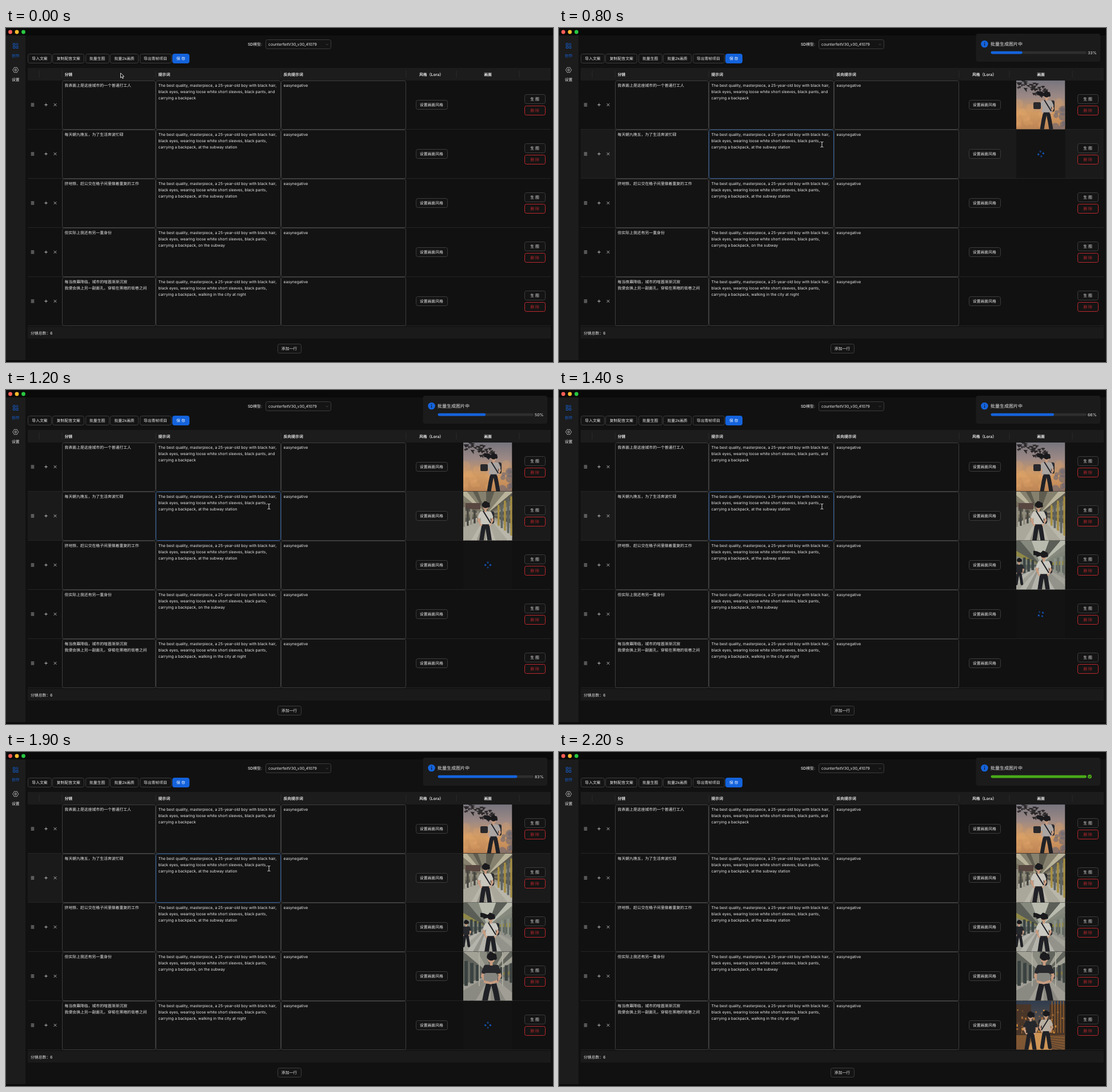
An HTML page with a canvas that plays this animation: 957x585 px, repeating every 2.3 s.

```html
<!DOCTYPE html>
<html lang="zh-CN">
<head>
<meta charset="utf-8">
<style>
html, body { margin: 0; width: 100%; height: 100%; overflow: hidden; background: #0b0b0b; }
canvas { display: block; width: 957px; height: 585px; }
</style>
</head>
<body>
<canvas id="stage"></canvas>
<script>
const W = 957, H = 585, LOOP = 2300, STEP = 100;
const START = 300, PER_ROW = 350, END = 2100;
const ROW_TOP = 92, ROW_H = 86, LINE = 11.4, PIC = 85.5, GAP = 2.5;
const COLS = [98, 262, 481, 700];
const BLUE = '#1463dc', RED = '#bd282e', GREEN = '#49aa19', TEXT = '#ebebeb', EDGE = '#3c3c3c';
const HAIR = '#1b1b1e', SKIN = '#c89c80';
const FAMILY = 'Inter, "Noto Sans CJK SC", "Noto Sans CJK", sans-serif';

const canvas = document.getElementById('stage');
const c = canvas.getContext('2d');
const dpr = window.devicePixelRatio || 1;
canvas.width = W * dpr;
canvas.height = H * dpr;

const PROMPT = 'The best quality, masterpiece, a 25-year-old boy with black hair,';
const WEAR = 'black eyes, wearing loose white short sleeves, black pants,';
const ROWS = [
  { story: ['我表面上是这座城市的一个普通打工人'], wear: WEAR + ' and', place: '', art: city },
  { story: ['每天朝九晚五，为了生活奔波忙碌'], place: ', at the subway station', art: station },
  { story: ['挤地铁、赶公交在格子间里做着重复的工作'], place: ', at the subway station', art: platform },
  { story: ['但实际上我还有另一重身份'], place: ', on the subway', art: train },
  { story: ['每当夜幕降临，城市的喧嚣渐渐沉寂', '我便会换上另一副面孔，穿梭在黑暗的街巷之间'],
    place: ', walking in the city at night', art: night }
];

// ---- drawing helpers
function rect(x, y, w, h, fill) {
  c.fillStyle = fill;
  c.fillRect(x, y, w, h);
}
function box(x, y, w, h, r, fill, edge) {
  c.beginPath();
  c.roundRect(x, y, w, h, r);
  if (fill) { c.fillStyle = fill; c.fill(); }
  if (edge) { c.strokeStyle = edge; c.lineWidth = 1; c.stroke(); }
}
function disc(x, y, r, fill) {
  c.fillStyle = fill;
  c.beginPath();
  c.arc(x, y, r, 0, Math.PI * 2);
  c.fill();
}
function ring(x, y, r, color) {
  c.strokeStyle = color;
  c.lineWidth = 0.8;
  c.beginPath();
  c.arc(x, y, r, 0, Math.PI * 2);
  c.stroke();
}
function trace(p) {
  c.beginPath();
  for (let i = 0; i < p.length; i += 2) c.lineTo(p[i], p[i + 1]);
}
function poly(fill, ...p) {
  trace(p);
  c.fillStyle = fill;
  c.fill();
}
function line(color, width, ...p) {
  trace(p);
  c.strokeStyle = color;
  c.lineWidth = width;
  c.stroke();
}
function setFont(size, weight) {
  c.font = `${weight} ${size}px ${FAMILY}`;
}
function text(s, x, y, { size = 6.85, color = TEXT, align = 'left', weight = 400 } = {}) {
  setFont(size, weight);
  c.textAlign = align;
  c.fillStyle = color;
  c.fillText(s, x, y + size * 0.37);
}
function button(s, x, y, { w, color = TEXT, edge = EDGE, fill = '#141414' } = {}) {
  setFont(6.85, 400);
  const width = w || c.measureText(s).width + 13.6;
  box(Math.floor(x) + 0.5, y, Math.round(width), 16, 3, fill, edge);
  text(s, x + width / 2, y + 8, { color, align: 'center' });
  return x + width + GAP;
}
function seeded(seed) {
  return () => (seed = (seed * 16807) % 2147483647) / 2147483647;
}
const pick = (list, rnd) => list[Math.floor(rnd() * list.length)];
const mix = (a, b, u) => a + (b - a) * Math.min(1, Math.max(0, u));

// ---- pictures
function sky(...stops) {
  const g = c.createLinearGradient(0, 0, 0, PIC);
  stops.forEach((s, i) => g.addColorStop(i / (stops.length - 1), s));
  rect(0, 0, PIC, PIC, g);
}
// wedges around a vanishing point: ceiling, walls and floor
function hall(vx, vy, seed, ceiling, wall, floor) {
  const rnd = seeded(seed), n = 36, turn = Math.PI * 2 / n;
  for (let i = 0; i < n; i++) {
    const a = i * turn, s = Math.sin(a + turn / 2);
    const tones = s < -0.45 ? ceiling : s > 0.4 ? floor : wall;
    poly(pick(tones, rnd), vx, vy, vx + Math.cos(a) * 130, vy + Math.sin(a) * 130,
      vx + Math.cos(a + turn * 1.1) * 130, vy + Math.sin(a + turn * 1.1) * 130);
  }
}
// upright panels that grow with distance from the vanishing point
function panels(from, to, n, vx, vy, tones, slope = 0.75) {
  for (let i = 0; i < n; i++) {
    const x = from + (to - from) * i / n, h = 6 + Math.abs(x - vx) * slope;
    rect(x, vy - h * 0.6, (to - from) / n * 0.6, h * 1.3, tones[i % tones.length]);
  }
}
// origin is the middle of the head
function figure(x, y, k, shirt, { bag = 0, stride = 8, wind = 0 } = {}) {
  const rnd = seeded(77), dark = '#202126';
  c.save();
  c.translate(x, y);
  c.scale(k, k);
  c.lineJoin = c.lineCap = 'round';
  if (bag) box(bag * 9 - 7, 9, 14, 23, 4, '#2a2b2f');
  for (const s of [-1, 1]) {
    line(dark, 8, s * 3, 34, s * stride * 0.7, 50, s * stride, 66);
    line(SKIN, 4, s * 9, 14, s * 13, 25, s * 8, 34);
    line(shirt, 6, s * 8, 12, s * 11, 19);
  }
  poly(shirt, -8, 9, 8, 9, 10, 33, -9, 33);
  if (bag) line(dark, 2.2, -bag * 4, 9, bag * 9, 30);
  rect(-2, 3, 4, 7, SKIN);
  disc(0, 1, 5, SKIN);
  disc(0, -3, 6, HAIR);
  for (let i = 0; i < 12; i++) {
    const a = Math.PI * (0.95 + i / 10);
    disc(Math.cos(a) * 5.5, Math.sin(a) * 5.5 - 2, 1 + rnd() * 1.8, HAIR);
  }
  for (let i = 0; i < wind; i++) line(HAIR, 2 + rnd() * 2, -3, -3, -12 - rnd() * 8, -9 + rnd() * 9);
  c.restore();
}
function city() {
  sky('#77757e', '#9c8985', '#d29a62', '#bd8454');
  const rnd = seeded(11);
  for (let i = 0; i < 26; i++) {
    const x = rnd() * PIC, y = 38 + rnd() * 46;
    disc(x, y, 3 + rnd() * 6, x + y > 125 ? '#6a667499' : '#e0a46a44');
  }
  for (let i = 0; i < 70; i++) {
    const u = rnd(), x = u * 52, y = 3 + u * 18 + (rnd() - 0.5) * 20;
    poly('#2b2829', x, y, x + 3 + rnd() * 6, y - 1 + rnd() * 2, x + 3, y + 2 + rnd() * 3);
  }
  figure(53, 27, 0.87, '#aaa5a2', { bag: 1, stride: 9, wind: 9 });
  box(30, 38, 13, 12, 2, '#29282b');
}
function station() {
  hall(40, 40, 5, ['#5f5c50', '#85816e', '#b9b39b'], ['#76705f', '#5c594f', '#8f8a78'], ['#aaa79b', '#b9b6aa', '#98958a']);
  rect(4, 20, 26, 11, '#584640');
  panels(0, 30, 5, 42, 43, ['#8f8c7f', '#484842'], 0.5);
  panels(60, 88, 5, 40, 40, ['#a89042', '#5d635f'], 1.1);
  figure(39, 26, 0.95, '#c9c6bd', { bag: 1 });
}
function platform() {
  hall(42, 42, 9, ['#5a5e56', '#868a7e', '#b8bbae'], ['#5e655e', '#80857a', '#8f8847'], ['#a3a299', '#b5b4ac', '#93938b']);
  panels(12, 34, 3, 42, 42, ['#3b4444'], 0.5);
  panels(66, 88, 4, 42, 42, ['#8d9287', '#6a7069'], 0.5);
  figure(5, 36, 0.6, '#26282c');
  figure(48, 27, 0.95, '#c9c8c1', { bag: 1, wind: 10 });
}
function train() {
  hall(48, 40, 3, ['#62655d', '#8a8b80', '#a3a296'], ['#686b63', '#7d7f76', '#7f7749'], ['#8b8a82', '#a09e95']);
  panels(2, 32, 3, 48, 36, ['#3a4341'], 0.6);
  panels(64, 90, 3, 48, 36, ['#3d4442'], 0.6);
  for (const x of [27, 68]) rect(x, 0, 1.6, 60, '#b3b3a6');
  figure(49, 12, 1.2, '#28292d', { stride: 10 });
  box(36, 37, 24, 19, 5, '#85857f');
  line(SKIN, 4, 36, 52, 48, 55, 60, 51);
}
function night() {
  sky('#303c4e', '#4b4a4c', '#835931', '#7c5535');
  const rnd = seeded(29);
  for (const x of [-4, 58]) rect(x, 6, 30, 54, '#493629');
  for (let i = 0; i < 60; i++) {
    rect(rnd() * 84, 14 + rnd() * 42, 1 + rnd() * 2.5, 1.5 + rnd() * 3, pick(['#d18a38', '#a76c35', '#5e4430'], rnd));
  }
  for (let i = 0; i < 5; i++) rect(62 + i * 5, 0, 1.2, 56, '#a3682c');
  poly('#cf9656', 32, 56, 50, 56, 62, 86, 20, 86);
  for (let i = 0; i < 7; i++) line('#5b412d', 1.5, 52 + i * 2, 60 + i * 4, 86, 62 + i * 5);
  figure(25, 27, 0.88, '#25272b');
  figure(52, 25, 0.85, '#b9aea1', { bag: -1 });
}

// ---- interface
function sidebar() {
  rect(0, 13, 34, 569, '#1c1c1c');
  ['#ff5f57', '#febc2e', '#28c840'].forEach((f, i) => disc(7.5 + i * 11.5, 7, 3.4, f));
  c.strokeStyle = BLUE;
  c.lineWidth = 0.8;
  for (let i = 0; i < 3; i++) c.strokeRect(12.6 + (i > 1) * 5.2, 27 + (i > 0) * 5.2, 3.2, 3.2);
  ring(19.4, 28.6, 1.7, BLUE);
  text('创作', 16.8, 48, { color: BLUE, align: 'center' });
  const gear = [];
  for (let i = 0; i <= 48; i++) {
    const a = i / 24 * Math.PI, r = 4.5 + 0.4 * Math.cos(a * 6);
    gear.push(16.8 + Math.cos(a) * r, 73.5 + Math.sin(a) * r);
  }
  line(TEXT, 0.8, ...gear);
  ring(16.8, 73.5, 1.6, TEXT);
  text('设置', 16.8, 90, { align: 'center' });
}
function toolbar(hot) {
  text('SD模型:', 448, 28.8, { align: 'right', weight: 500 });
  box(454.5, 20.5, 114, 16, 3, '#141414', EDGE);
  text('counterfeitV30_v30_41079', 459, 28.8);
  line('#555', 0.8, 559.5, 27.8, 561.5, 29.8, 563.5, 27.8);
  let x = 38.5;
  for (const s of ['导入文案', '复制配音文案', '批量生图', '批量2k画质', '导出青帧项目']) {
    const on = hot && s === '批量生图';
    x = button(s, x, 45.5, on ? { color: '#3c89e8', edge: '#3c89e8' } : {});
  }
  button('保 存', x, 45.5, { color: '#fff', edge: BLUE, fill: BLUE });
}
function header() {
  rect(38, 70, 915, 22, '#1c1c1c');
  for (const x of [58, ...COLS, 788, 898]) rect(x - 0.5, 75, 1, 12, '#2a2a2a');
  ['分镜', '提示词', '反向提示词'].forEach((s, i) => text(s, COLS[i] + 4.5, 81, { weight: 600 }));
  text('风格（Lora）', 744, 81, { weight: 600, align: 'center' });
  text('画面', 843, 81, { weight: 600, align: 'center' });
}
function lines(list, col, y, size) {
  list.forEach((s, k) => text(s, COLS[col] + 4.6, y + 8 + k * LINE, { size }));
}
function row(i, hover) {
  const { story, wear = WEAR, place } = ROWS[i], y = ROW_TOP + i * ROW_H, m = y + 42.5;
  if (hover) rect(38, y, 915, ROW_H, '#1a1a1a');
  rect(38, y + 85, 915, 1, '#242424');
  for (let k = -1; k < 2; k++) line(TEXT, 0.7, 43.7, m + k * 2.3, 49.3, m + k * 2.3);
  line(TEXT, 0.7, 67.2, m, 72.8, m);
  line(TEXT, 0.7, 70, m - 2.8, 70, m + 2.8);
  for (const s of [-1, 1]) line(TEXT, 0.7, 83.6, m - s * 2.4, 88.4, m + s * 2.4);
  for (let k = 0; k < 3; k++) {
    box(COLS[k] + 0.5, y + 0.5, COLS[k + 1] - COLS[k] - 1, 85, 3, '#131313', hover && k === 1 ? '#2b5a97' : '#3e3e3e');
  }
  lines(story, 0, y);
  lines([PROMPT, wear, 'carrying a backpack' + place], 1, y, 6.8);
  lines(['easynegative'], 2, y, 6.8);
  button('设置画面风格', 717, m - 8);
  button('生 图', 907, m - 18, { w: 36 });
  button('删 除', 907, m + 2, { w: 36, color: RED, edge: RED });
}
function picture(i) {
  c.save();
  c.translate(800, ROW_TOP + i * ROW_H);
  c.beginPath();
  c.rect(0, 0, PIC, PIC);
  c.clip();
  ROWS[i].art();
  c.restore();
}
function spinner(i, t) {
  const y = ROW_TOP + i * ROW_H, age = t - START - i * PER_ROW;
  rect(800, y, PIC, 85, '#131313');
  c.save();
  c.translate(843, y + 42.5);
  c.rotate(age * 0.225 * Math.PI / 180);
  for (let k = 0; k < 4; k++) {
    c.globalAlpha = 0.4 + 0.4 * Math.abs(Math.sin(age / 400 + k * 0.8));
    disc(k % 2 ? 3.1 : -3.1, k > 1 ? 3.1 : -3.1, 1.7, BLUE);
  }
  c.restore();
}
function notice(done) {
  const full = done === ROWS.length + 1, pct = Math.floor(done / (ROWS.length + 1) * 100);
  box(729.5, 10, 217.5, 49, 4, '#1b1b1b');
  disc(744.5, 28, 6.3, BLUE);
  rect(744, 27, 1.1, 4.2, '#1b1b1b');
  disc(744.5, 25.2, 0.8, '#1b1b1b');
  text('批量生成图片中', 755, 28, { size: 8 });
  box(755.5, 40.8, 167.5, 4.6, 2.3, '#2e2e2e');
  box(755.5, 40.8, 167.5 * pct / 100, 4.6, 2.3, full ? GREEN : BLUE);
  if (full) {
    disc(928.5, 43.1, 3.5, GREEN);
    line('#1b1b1b', 0.9, 926.8, 43.2, 928.1, 44.5, 930.3, 41.7);
  } else text(pct + '%', 925, 43.1, { size: 7 });
}
function arrow(x, y) {
  const p = [0, 0, 0, 8.2, 2, 6.4, 3.4, 9.4, 4.8, 8.8, 3.5, 5.9, 6, 5.7, 0, 0].map((v, i) => v + (i % 2 ? y : x));
  poly('#0a0a0a', ...p);
  line('#eee', 0.9, ...p);
}
function beam(x, y) {
  line('#d5d5d5', 1, x, y - 4, x, y + 4);
  for (const s of [-1, 1]) line('#d5d5d5', 1, x - 2.5, y + s * 4.7, x, y + s * 4, x + 2.5, y + s * 4.7);
}
function pointer(t) {
  const go = t / 200, leave = (t - 200) / 200;
  const x = mix(mix(200.5, 160, go), 460, leave), y = mix(mix(79, 54, go), 204, leave);
  (t < START ? arrow : beam)(x, y);
}

function draw(t) {
  c.setTransform(dpr, 0, 0, dpr, 0, 0);
  c.textRendering = 'geometricPrecision';
  const done = Math.min(ROWS.length + 1, Math.floor((t - START) / PER_ROW) + 1);
  const over = t < START || t >= END ? -1 : t < 400 ? 0 : 1;
  rect(0, 0, W, H, '#0a0a0a');
  rect(34, 13, W - 34, 569, '#111');
  sidebar();
  toolbar(t === 200);
  header();
  ROWS.forEach((_, i) => {
    row(i, i === over);
    if (i < done - 1) picture(i);
    else if (i === done - 1) spinner(i, t);
  });
  rect(38, 523.5, 915, 20.5, '#1a1a1a');
  text('分镜总数：6', 43, 534);
  button('添加一行', 475, 553.5);
  if (done > 0) notice(done);
  if (t < END) pointer(t);
}

let last = -1;
const begin = performance.now();
function tick() {
  const t = Math.floor((performance.now() - begin) % LOOP / STEP) * STEP;
  if (t !== last) draw(last = t);
  requestAnimationFrame(tick);
}
tick();
</script>
</body>
</html>
```
